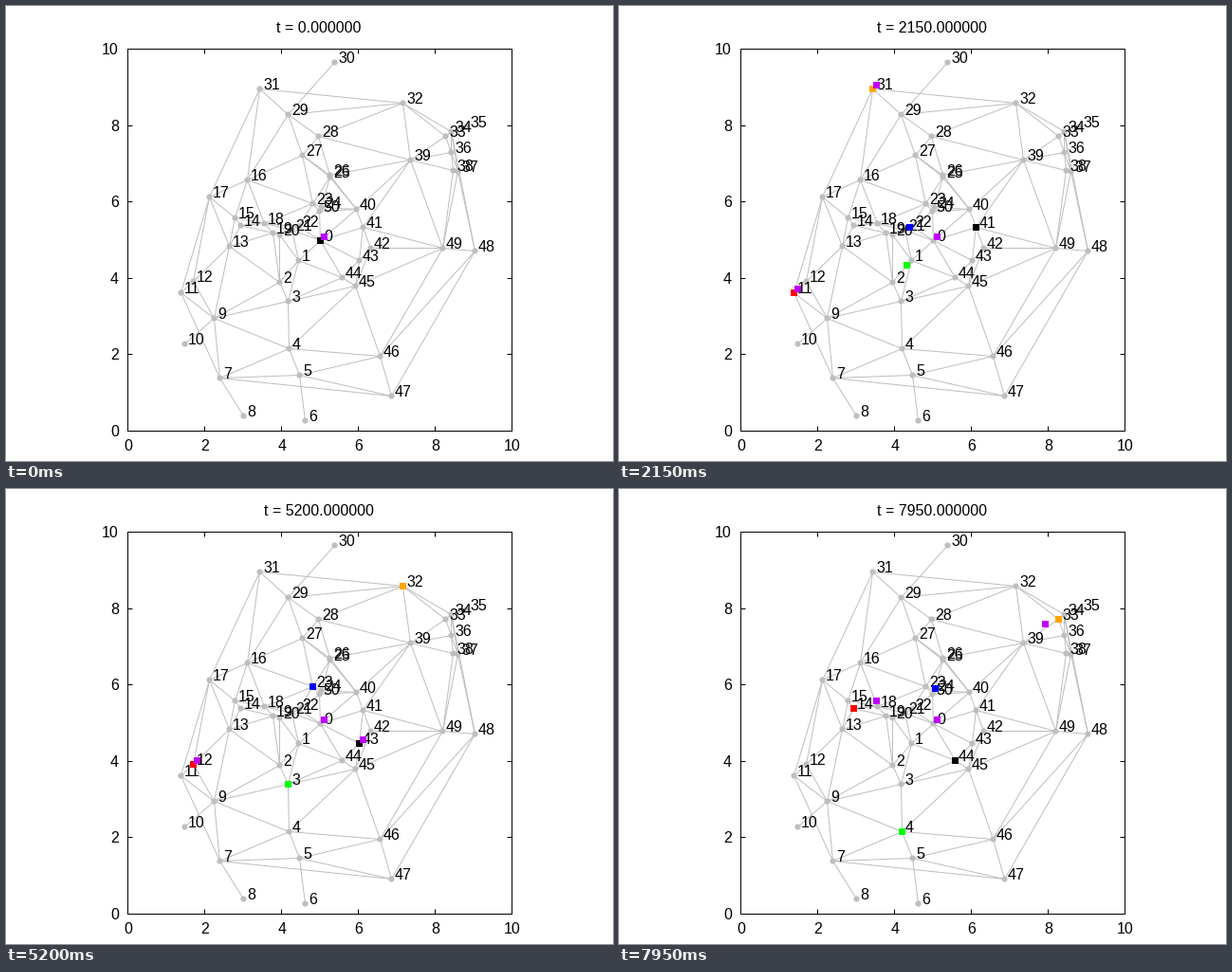
A matplotlib script that plays this animation: 640x480 px, repeating every 8 s.

```python
import math

import matplotlib.pyplot as plt
import numpy as np
from matplotlib.animation import FuncAnimation
from matplotlib.collections import LineCollection
from matplotlib.patches import Circle, Rectangle
from matplotlib.tri import Triangulation

DPI = 100
PX = 72 / DPI
STEP, FRAMES = 50, 160
WALK, FLY = 0.1105, 0.30     # px per ms
DWELL = 1805                 # ms a walker spends at each stop
GRAY, PURPLE = "#bebebe", "#c000ff"
LEFT, RIGHT, TOP, BOTTOM = 128, 533, 45, 448

# Places of the graph, numbered in order around the middle
NODES = np.array([
    (331, 247), (308, 268), (288, 291), (297, 311), (298, 361), (309, 389),
    (315, 437), (225, 392), (250, 432), (219, 329), (188, 356), (184, 302),
    (197, 290), (235, 253), (247, 231), (241, 223), (254, 183), (214, 201),
    (272, 229), (281, 239), (288, 241), (301, 236), (308, 232), (323, 208),
    (332, 212), (341, 180), (341, 178), (312, 157), (329, 137), (297, 114),
    (346, 59), (267, 87), (418, 102), (463, 137), (469, 132), (485, 127),
    (469, 154), (476, 174), (471, 173), (426, 162), (369, 214), (376, 233),
    (384, 255), (372, 268), (354, 286), (368, 295), (394, 369), (406, 411),
    (494, 258), (460, 255), (330, 216),
])
DEAD_ENDS = [6, 8, 10, 30, 35]

# Walker k visits the nodes 10k+1, 10k+2, ...
COLORS = ["#00ff00", "#ff0000", "#0000ff", "#ffa500", "#000000"]
FIRST_WALK = {1: [1, 2, 9], 3: [50, 23, 27, 29]}


def graph_edges():
    """Delaunay mesh, with each dead end tied to its nearest node."""
    inner = np.delete(np.arange(len(NODES)), DEAD_ENDS)
    edges = [tuple(inner[e]) for e in Triangulation(*NODES[inner].T).edges]
    for i in DEAD_ENDS:
        dist = np.hypot(*(NODES[inner] - NODES[i]).T)
        edges.append((i, inner[dist.argmin()]))
    return edges


def go(keys, node, speed):
    t, x, y = keys[-1]
    nx, ny = NODES[node]
    keys.append((t + math.hypot(nx - x, ny - y) / speed, nx, ny))


def wait_until(keys, t):
    keys.append((t, *keys[-1][1:]))


def walker(k, stops=5):
    keys = [(0, *NODES[0])]
    for node in FIRST_WALK.get(k, []):
        go(keys, node, WALK)
    for n in range(1, stops + 1):
        go(keys, 10 * k + n, WALK)
        wait_until(keys, keys[-1][0] + DWELL)
    return keys[:-1]


def helper(k, stops, hops):
    """Go along with walker k, then make hops of (start, node, speed)."""
    keys = walker(k, stops)
    for start, node, speed in hops:
        wait_until(keys, start)
        go(keys, node, speed)
    return keys


def position(keys, t):
    ts, xs, ys = np.array(keys).T
    return np.interp(t, ts, xs), np.interp(t, ts, ys)


plt.rcParams["font.family"] = "Liberation Sans"
plt.rcParams["font.size"] = 16 * PX

# Whole numbers are pixel centres
fig = plt.figure(figsize=(640 / DPI, 480 / DPI), dpi=DPI, facecolor="white")
ax = fig.add_axes([0, 0, 1, 1])
ax.set_xlim(-0.5, 639.5)
ax.set_ylim(479.5, -0.5)
ax.axis("off")


def label(x, y, text, ha="left"):
    return ax.text(x - 0.5, y + 0.5, text, ha=ha, va="baseline",
                   color="black", zorder=4)


def draw_lines(lines, color, z):
    ax.add_collection(LineCollection(lines, colors=color, linewidths=PX,
                                     snap=False, zorder=z))


def draw_frame():
    ax.add_patch(Rectangle((LEFT, TOP), RIGHT - LEFT, BOTTOM - TOP, fill=False,
                           ec="black", lw=PX, snap=False, zorder=1))
    ticks = []
    for v in range(0, 11, 2):
        x = round(LEFT + (RIGHT - LEFT) * v / 10)
        y = round(BOTTOM - (BOTTOM - TOP) * v / 10)
        ticks += [[(x, BOTTOM), (x, BOTTOM - 5)], [(x, TOP), (x, TOP + 5)],
                  [(LEFT, y), (LEFT + 5, y)], [(RIGHT, y), (RIGHT - 5, y)]]
        label(x + 1, 468, str(v), "center")
        label(119, y + 5, str(v), "right")
    draw_lines(ticks, "black", 1)


def draw_graph():
    draw_lines([NODES[list(e)] for e in graph_edges()], GRAY, 2)
    for i, (x, y) in enumerate(NODES):
        ax.add_patch(Circle((x, y), 3.1, fc=GRAY, ec="none", zorder=3))
        label(x + 4, y, str(i))


def square(color, z):
    return ax.add_patch(Rectangle((0, 0), 7, 7, fc=color, ec="none", lw=0,
                                  antialiased=False, zorder=z))


draw_frame()
draw_graph()
title = label(330, 27, "", "center")

helpers = [
    [(0, *NODES[0])],
    helper(1, 2, [(5788, 24, FLY), (7728, 14, FLY)]),
    helper(3, 1, [(2490, 42, FLY), (4248, 43, WALK), (5400, 3, FLY),
                  (6577, 13, FLY), (7165, 33, FLY)]),
]

# (keyframes, pixel offset, patch)
movers = [(walker(k), 0, square(c, 5)) for k, c in enumerate(COLORS)]
movers += [(keys, 4, square(PURPLE, 6)) for keys in helpers]


def update(i):
    t = i * STEP
    title.set_text(f"t = {t:f}")
    for keys, off, patch in movers:
        x, y = position(keys, t)
        patch.set_xy((round(x) + off - 3.5, round(y) - off - 3.5))
    return [title] + [m[2] for m in movers]


anim = FuncAnimation(fig, update, frames=FRAMES, interval=STEP, repeat=True,
                     repeat_delay=0, blit=False)
plt.show()
```
